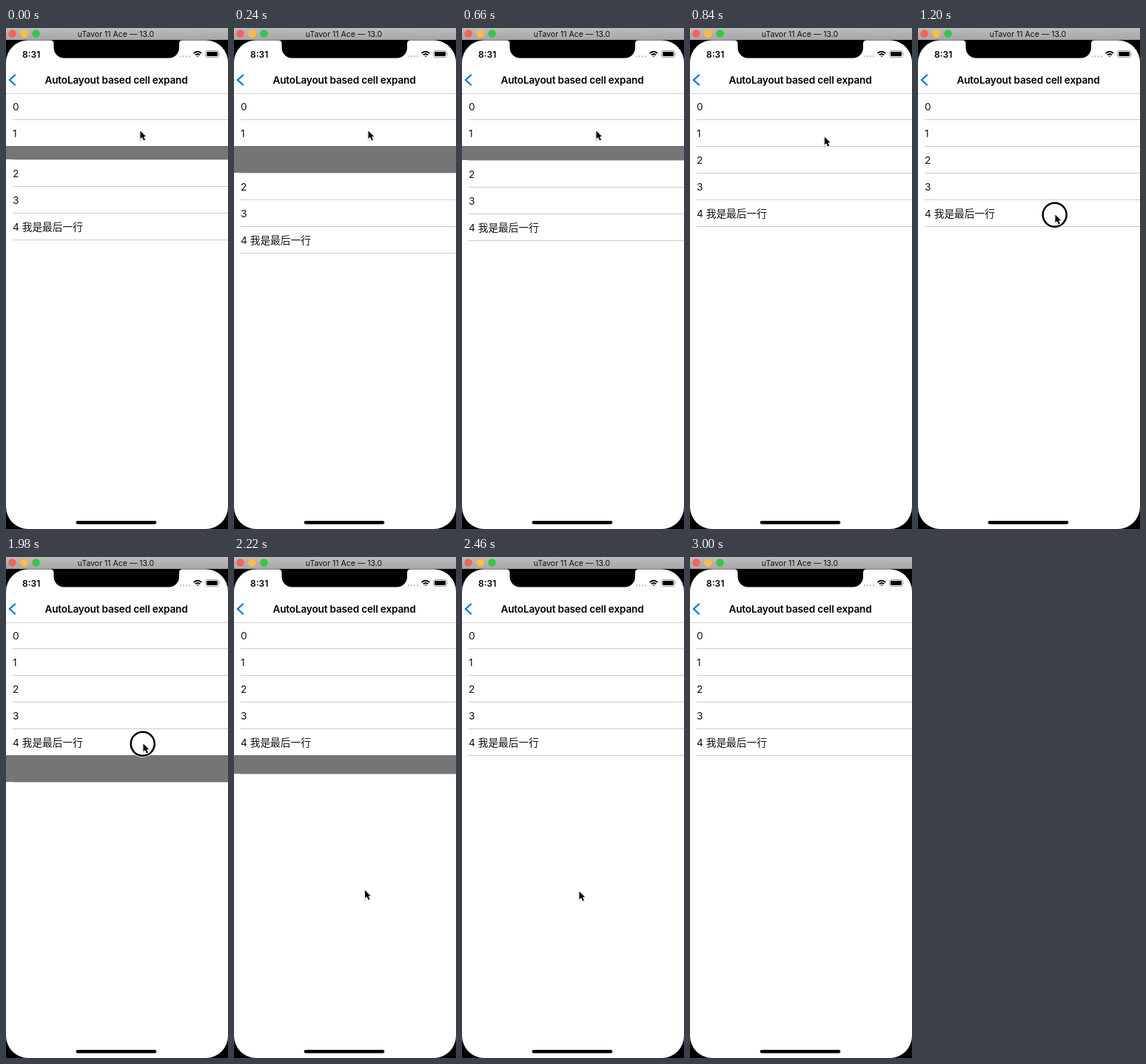
Write an HTML page that moves like this. It is 300 px wide and 675 px high and loops after 3300 ms.

```html
<!DOCTYPE html>
<html lang="en">
<head>
<meta charset="utf-8">
<style>
html, body { margin: 0; width: 100%; height: 100%; overflow: hidden; background: #000; }
svg { display: block; width: 100%; height: 100%; }
text { font-family: Inter, "Noto Sans CJK SC", "Noto Sans CJK", sans-serif; fill: #111; }
.bold { font-weight: 600; fill: #000; }
.row { font-size: 13.7px; }
</style>
</head>
<body>
<svg viewBox="0 0 300 675">
  <defs>
    <linearGradient id="bar" x2="0" y2="1">
      <stop stop-color="#bdbdbd"/><stop offset="1" stop-color="#a6a6a6"/>
    </linearGradient>
  </defs>

  <!-- Window bar -->
  <rect width="300" height="16" fill="url(#bar)"/>
  <circle cx="8.5" cy="7.6" r="5.3" fill="#fc605b"/>
  <circle cx="24.5" cy="7.6" r="5.3" fill="#fdbc40"/>
  <circle cx="40.5" cy="7.6" r="5.3" fill="#34c749"/>
  <text x="148.5" y="12" font-size="10.5" text-anchor="middle">uTavor 11 Ace — 13.0</text>

  <!-- Screen with notch -->
  <path fill="#fff" d="M0 46.5A30 30 0 0 1 30 16.5H60Q64.5 16.5 64.5 21V26.5A14 14 0 0 0 78.5 40.5H220A14 14 0 0 0 234 26.5V21Q234 16.5 238.5 16.5H270A30 30 0 0 1 300 46.5V645A30 30 0 0 1 270 675H30A30 30 0 0 1 0 645Z"/>
  <rect x="94.7" y="664" width="108.6" height="4.6" rx="2.3"/>

  <!-- Status bar -->
  <text class="bold" x="22" y="39.5" font-size="12">8:31</text>
  <path d="M236 38.2h13" stroke="#c4c4c4" stroke-width="2.4" stroke-linecap="round" stroke-dasharray="0 4"/>
  <g fill="none" stroke="#000" stroke-width="1.9">
    <path d="M253.8 34Q259 29.4 264.2 34M255.8 36.4Q259 33.6 262.2 36.4"/>
    <path d="M257.4 37.5h3.2L259 39.2z" fill="#000" stroke="none"/>
  </g>
  <rect x="269.5" y="30.5" width="18" height="9" rx="2.6" fill="none" stroke="#999"/>
  <rect x="271" y="32" width="15" height="6" rx="1.4"/>
  <path d="M288.6 33.5q1.5 1.5 0 3z" fill="#999"/>

  <!-- Navigation bar -->
  <path d="M12.6 62.8L4.9 70L12.6 77.2" fill="none" stroke="#087cff" stroke-width="2.3"/>
  <text class="bold" x="149" y="75" font-size="13.6" letter-spacing="-.18" text-anchor="middle">AutoLayout based cell expand</text>
  <rect y="88" width="300" height="1" fill="#d2d2d2"/>

  <g id="rows"></g>
  <g id="pointer">
    <g id="ring" fill="none">
      <circle cx="-.3" cy=".7" r="16" stroke="#fff" stroke-width="4.4"/>
      <circle cx="-.3" cy=".7" r="16" stroke="#000" stroke-width="2.5"/>
    </g>
    <path d="M0 1.5L1 14.5" stroke="#0002" stroke-width="3"/>
    <path d="M.5 .5V11.2L3 9L5 13.4L7 12.5L5 8.2H8.2Z" stroke="#fff" stroke-width="1.6" paint-order="stroke"/>
  </g>
</svg>
<script>
const LOOP = 3300, TICK = 60, TOP = 88, ROW = 36;
const $ = id => document.getElementById(id);

const ease = p => {
  p = Math.min(1, Math.max(0, p));
  return p * p * (3 - 2 * p);
};
const openness = (t, open, close) => ease((t - open) / 330) - ease((t - close) / 330);

const rows = ['0', '1', '2', '3', '4 我是最后一行'].map(label => {
  const g = document.createElementNS('http://www.w3.org/2000/svg', 'g');
  g.innerHTML = `<text class="row" x="9" y="23">${label}</text>
    <rect y="${ROW - 1}" width="300" height="0" fill="#757575"/>
    <rect x="9" width="291" height="1" fill="#cbcbcb"/>`;
  $('rows').append(g);
  const [, panel, line] = g.children;
  return { g, panel, line };
});

// Pointer stops: time, x, y
const stops = [
  [0, 181, 138], [780, 181, 138], [1140, 185, 251], [2100, 185, 251],
  [2340, 168, 646], [2460, 158, 450], [2940, 60, 668], [LOOP, 60, 690]
];
const clicks = [[360, 540], [1200, 1320], [1980, 2100]];

function pointerAt(t) {
  const i = stops.findIndex(s => s[0] > t);
  const [t0, x0, y0] = stops[i - 1], [t1, x1, y1] = stops[i];
  const p = ease((t - t0) / (t1 - t0));
  return [x0 + (x1 - x0) * p, y0 + (y1 - y0) * p];
}

function draw() {
  const t = Math.floor(performance.now() % LOOP / TICK) * TICK;
  const gaps = [0, openness(t, -165, 502), 0, 0, openness(t, 1260, 2100)];
  let y = TOP;
  rows.forEach(({ g, panel, line }, i) => {
    const gap = Math.round(gaps[i] * ROW);
    g.setAttribute('transform', `translate(0 ${y})`);
    panel.setAttribute('height', gap);
    line.setAttribute('y', ROW + gap - 1);
    y += ROW + gap;
  });
  $('pointer').setAttribute('transform', `translate(${pointerAt(t)})`);
  $('pointer').style.display = t < 3000 ? '' : 'none';
  $('ring').style.display = clicks.some(([a, b]) => t >= a && t < b) ? '' : 'none';
  requestAnimationFrame(draw);
}
draw();
</script>
</body>
</html>
```
